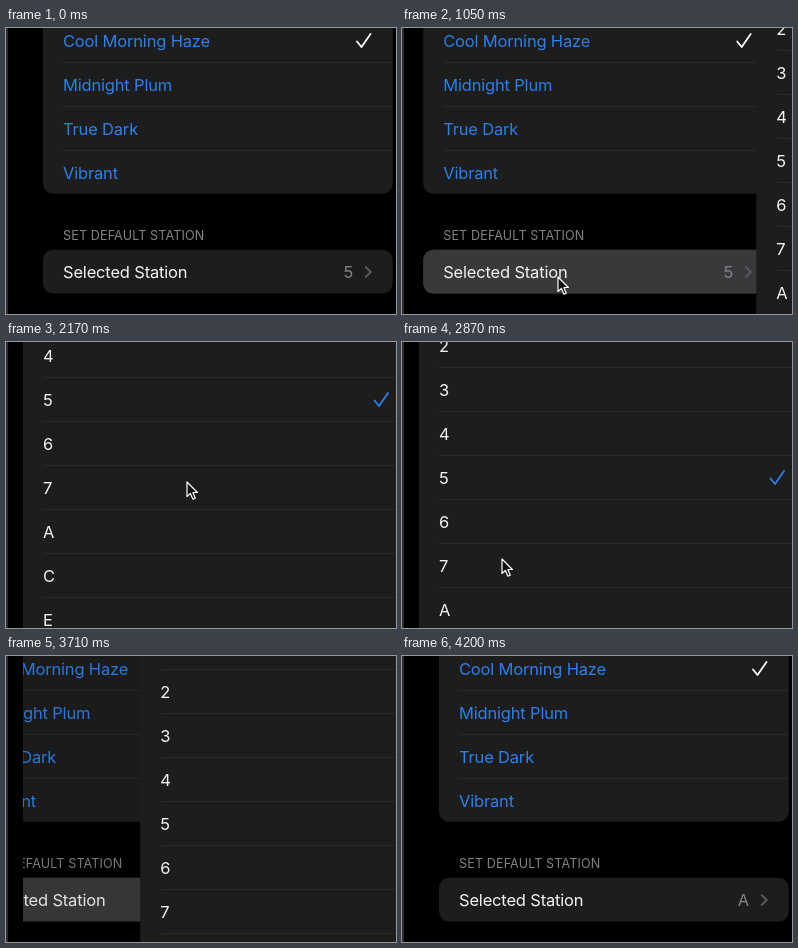
An HTML page for the animation above (4550 ms loop, 390x286 px).

```html
<!DOCTYPE html>
<html lang="en">
<head>
<meta charset="utf-8">
<title>Default station</title>
<style>
html, body { margin: 0; width: 100%; height: 100%; overflow: hidden; background: #000; }
svg { display: block; width: 390px; height: 286px; }
text { font: 400 16.5px Inter, "Liberation Sans", sans-serif; letter-spacing: -0.18px; fill: #f4f4f4; }
.link { fill: #2c80ec; }
.head { font-size: 12.6px; letter-spacing: 0.12px; fill: #828286; }
.value { fill: #848488; text-anchor: end; }
.card { fill: #1d1d1e; }
.line { fill: #2a2a2b; }
.press { fill: #3a3a3c; }
.tick { fill: none; stroke-width: 1.8; stroke-linecap: round; stroke-linejoin: round; }
</style>
</head>
<body>
<svg viewBox="0 0 390 286">
  <defs><clipPath id="screen"><rect x="17" width="373" height="286"/></clipPath></defs>
  <rect width="390" height="286"/>
  <rect width="2" height="286" fill="#2c2c2c"/>
  <g clip-path="url(#screen)">
    <g id="menu">
      <rect class="card" x="37" y="-30" width="349.7" height="195.8" rx="10"/>
      <g id="themes"></g>
      <path class="tick" stroke="#fff" d="M351 13.5L355.5 19L364.5 6"/>
      <text class="head" x="57" y="212">SET DEFAULT STATION</text>
      <rect class="card" x="37" y="221.8" width="349.7" height="43.8" rx="10"/>
      <rect class="press" id="press" x="37" y="221.8" width="349.7" height="43.8" rx="10"/>
      <text x="57" y="250">Selected Station</text>
      <text class="value" id="value" x="347" y="250">5</text>
      <path class="tick" stroke="#5c5c60" d="M359.5 239L364.8 244L359.5 249"/>
    </g>
    <rect id="dim" width="390" height="286"/>
    <g id="panel">
      <rect class="card" width="390" height="286"/>
      <g id="list">
        <rect class="press" id="tap" y="110" width="390" height="44"/>
        <g id="rows"></g>
        <path class="tick" id="tick" stroke="#2c80ec" d="M351.5 .5L356 6L365 -7"/>
      </g>
    </g>
  </g>
  <path id="cursor" d="M0 0V14.5L3.4 11.4L5.9 17.2L8.3 16.2L5.9 10.5H10.4Z"
        fill="#111" stroke="#fff" stroke-width="1.2" stroke-linejoin="round"/>
</svg>
<script>
const LOOP = 4550, STEP = 70, ROW = 44, WIDTH = 390, LEFT = 17;
const PUSH = 1011, TAP = 3500, POP = 3643;
const $ = id => document.getElementById(id);
const clamp = v => Math.min(1, Math.max(0, v));
const move = (el, x, y) => el.setAttribute("transform", `translate(${x.toFixed(2)} ${y.toFixed(2)})`);
const show = (el, on) => el.setAttribute("opacity", +on);

// [time, x, y] of the pointer, then [time, y] of row "5"
const pointer = [
  [70, 374, 5], [490, 61, 268], [910, 156, 249], [1050, 156, 249], [1330, 152, 244],
  [1610, 166, 226], [2170, 181, 140], [2310, 181, 140], [2870, 100, 217],
  [3150, 73, 253], [3220, 73, 253], [3360, 73, 261], [3430, 73, 261], [3640, 75, 292]
];
const scroll = [[1610, 133], [2170, 58], [2310, 58], [2870, 136], [3150, 133]];

function track(keys, t, col) {
  const i = keys.findIndex(k => k[0] > t);
  if (i === 0) return keys[0][col];
  if (i < 0) return keys[keys.length - 1][col];
  const a = keys[i - 1], b = keys[i];
  const u = (t - a[0]) / (b[0] - a[0]);
  return a[col] + (b[col] - a[col]) * u * u * (3 - 2 * u);
}

// critically damped slide
function spring(ms) {
  if (ms <= 0) return 0;
  const u = ms * 0.0164, p = 1 - (1 + u) * Math.exp(-u);
  return p > 0.998 ? 1 : p;
}

$("themes").innerHTML = ["Cool Morning Haze", "Midnight Plum", "True Dark", "Vibrant"].map((name, i) =>
  `<text class="link" x="57" y="${19 + i * ROW}">${name}</text>` +
  (i < 3 ? `<rect class="line" x="57" y="${34 + i * ROW}" width="329.7" height="1"/>` : "")).join("");

$("rows").innerHTML = [..."1234567ACE"].map((name, i) => {
  const y = (i - 4) * ROW;
  return `<text x="20" y="${y + 6}">${name}</text>` +
    `<rect class="line" x="20" y="${y - 23}" width="370" height="1"/>`;
}).join("");

function draw(t) {
  const popping = t >= POP;
  const open = popping ? 1 - spring(t - POP) : spring(t - PUSH);
  move($("menu"), -0.3 * WIDTH * open, 0);
  $("dim").setAttribute("opacity", 0.1 * open);
  $("press").setAttribute("opacity", t < 910 ? 0 : clamp((4200 - t) / 280));
  $("value").textContent = popping ? "A" : "5";

  move($("panel"), LEFT + WIDTH * (1 - open), 0);
  move($("list"), 0, track(scroll, t, 1) + (popping ? 35 : 0));
  show($("tap"), t >= TAP && !popping);
  move($("tick"), 0, t >= TAP + STEP ? 3 * ROW : 0);

  move($("cursor"), track(pointer, t, 1), track(pointer, t, 2));
  show($("cursor"), t >= 70 && t < 3640);
}

const start = performance.now();
function tick() {
  const t = (performance.now() - start) % LOOP;
  draw(Math.floor(t / STEP) * STEP);
  requestAnimationFrame(tick);
}
tick();
</script>
</body>
</html>
```
